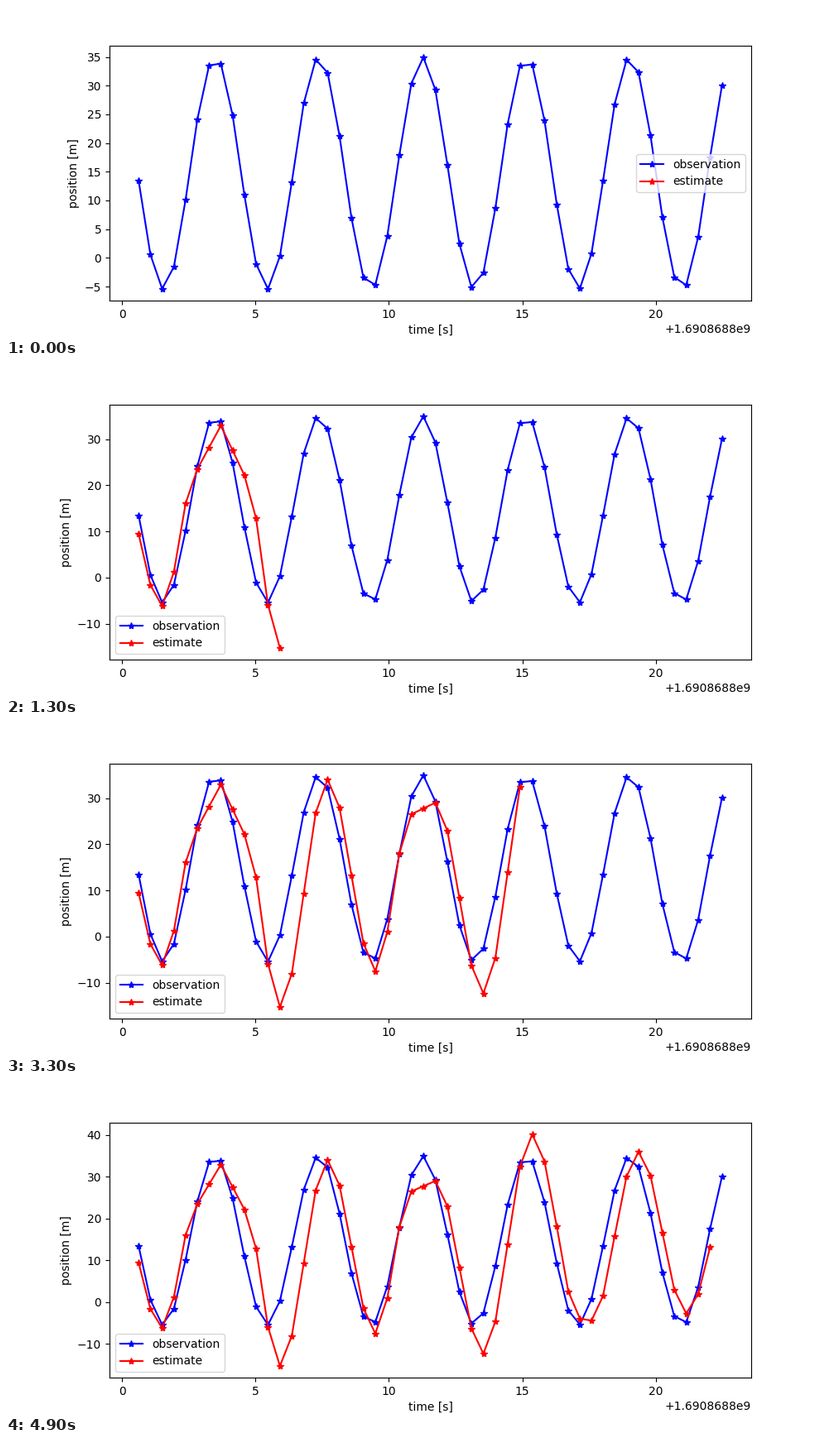
Animation, 1000 px wide and 400 px high, one loop 5 s. Source, as a matplotlib script:

```python
import numpy as np
import matplotlib.pyplot as plt
from matplotlib.animation import FuncAnimation

START = 1690868800
COUNT = 50
MEAN, SWING = 14.75, 20.2
PERIOD, TROUGH = 3.886, 1.55


def ease_through(steps, points):
    """Cosine-eased curve through (step, value) points."""
    keys, values = np.array(points).T
    pos = np.interp(steps, keys, np.arange(len(keys)))
    left = np.minimum(pos.astype(int), len(keys) - 2)
    mix = (1 - np.cos(np.pi * (pos - left))) / 2
    return values[left] + (values[left + 1] - values[left]) * mix


steps = np.arange(COUNT)

# slightly uneven sampling clock
seconds = np.interp(steps, [0, 10, 20, 30, 35, 40, 49],
                    [0.62, 5.02, 9.49, 13.99, 16.29, 18.46, 22.485])
times = START + seconds

observed = MEAN - SWING * np.cos(2 * np.pi * (seconds - TROUGH) / PERIOD)

# bends of the lagging, overshooting estimate
estimated = ease_through(steps, [
    (-2, 25), (2, -6.18), (5, 23.5), (7, 32.9), (9, 22.2), (12, -15.25),
    (16, 34), (20, -7.5), (23, 26.5), (25, 29), (29, -12.3), (33, 40.15),
    (37, -3.9), (38, -4.4), (42, 36), (46, -2.7), (50, 29)])

fig, ax = plt.subplots(figsize=(10, 4), dpi=100)
ax.plot(times, observed, "b*-", label="observation")
estimate, = ax.plot([], [], "r*-", label="estimate")
ax.set_xlabel("time [s]")
ax.set_ylabel("position [m]")


def update(count):
    estimate.set_data(times[:count], estimated[:count])
    ax.relim()
    ax.autoscale_view()
    # the legend moves away once the estimate dips low
    ax.legend(loc="center right" if count < 13 else "lower left")
    return estimate,


anim = FuncAnimation(fig, update, frames=COUNT, interval=100,
                     repeat=True, repeat_delay=0, blit=False)
plt.show()
```
